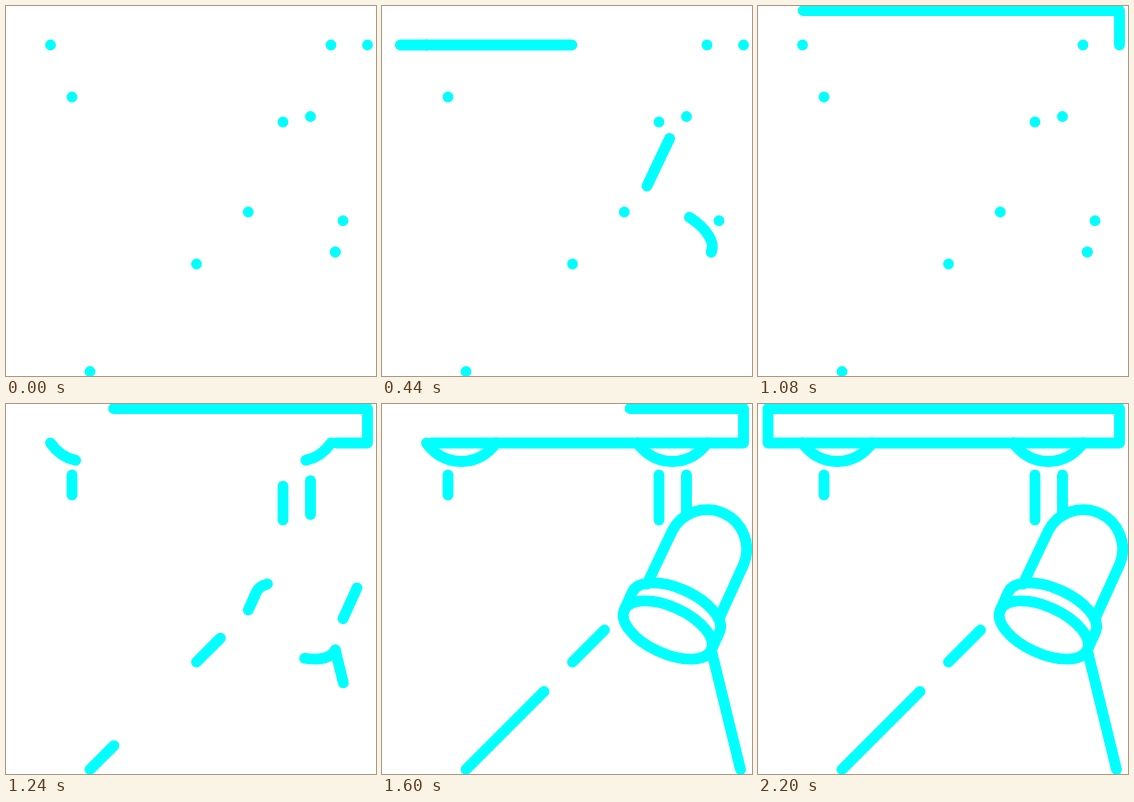
An HTML page for the animation above (2440 ms loop, 370x370 px).

```html
<!DOCTYPE html>
<html lang="en">
<head>
<meta charset="utf-8">
<title>Spotlight line drawing</title>
<style>
  html, body { margin: 0; width: 100%; height: 100%; overflow: hidden; background: #fff; }
  svg { display: block; width: 100%; height: 100%; }
  path { fill: none; stroke: #0ff; stroke-width: 10.8; stroke-linecap: round; stroke-linejoin: round; }
</style>
</head>
<body>
<svg viewBox="0 0 370 370">
  <g id="mount">
    <path d="M361.5 39H10V4.5H361.5Z"/>
    <path d="M44.5 39A41.9 41.9 0 0 0 114 39"/>
    <path d="M325 39A41.9 41.9 0 0 1 255.5 39"/>
  </g>
  <g id="lamp">
    <path d="M66 91V71"/>
    <path d="M277 116V71"/>
    <path d="M304.5 110.5V71"/>
    <path d="M337 214.7L361.7 160.3A39.5 39.5 0 0 0 290.3 126.7L265 180"/>
    <path d="M242.3 206L250.4 188A47.8 23.3 24.7 0 1 337.5 228L329.3 246"/>
    <path d="M329.3 246A47.8 23.3 24.7 0 1 242.3 206A47.8 23.3 24.7 0 1 329.3 246"/>
    <path d="M329.3 246L358.5 365.5"/>
    <path d="M84 365.5L162 287.5"/>
    <path d="M190.5 258L222.5 226"/>
  </g>
</svg>
<script>
const LOOP = 2440, STEP = 40, HALF = 1200, FULL = 2200;
const mount = document.getElementById('mount');
const lamp = document.getElementById('lamp');

// A dash runs off along each path; from half time a second one fills in behind it.
function setDash(group, speed, t) {
  const head = Math.max(0, 2 * speed * (t - HALF));
  const tail = speed * t;
  group.setAttribute('stroke-dasharray', [head, tail - head, tail, 2000].join(' '));
}

function draw() {
  const now = performance.now() % LOOP;
  const t = Math.min(FULL, Math.floor(now / STEP) * STEP);
  setDash(mount, 0.39, t);
  setDash(lamp, 0.423, t);
  requestAnimationFrame(draw);
}
draw();
</script>
</body>
</html>
```
